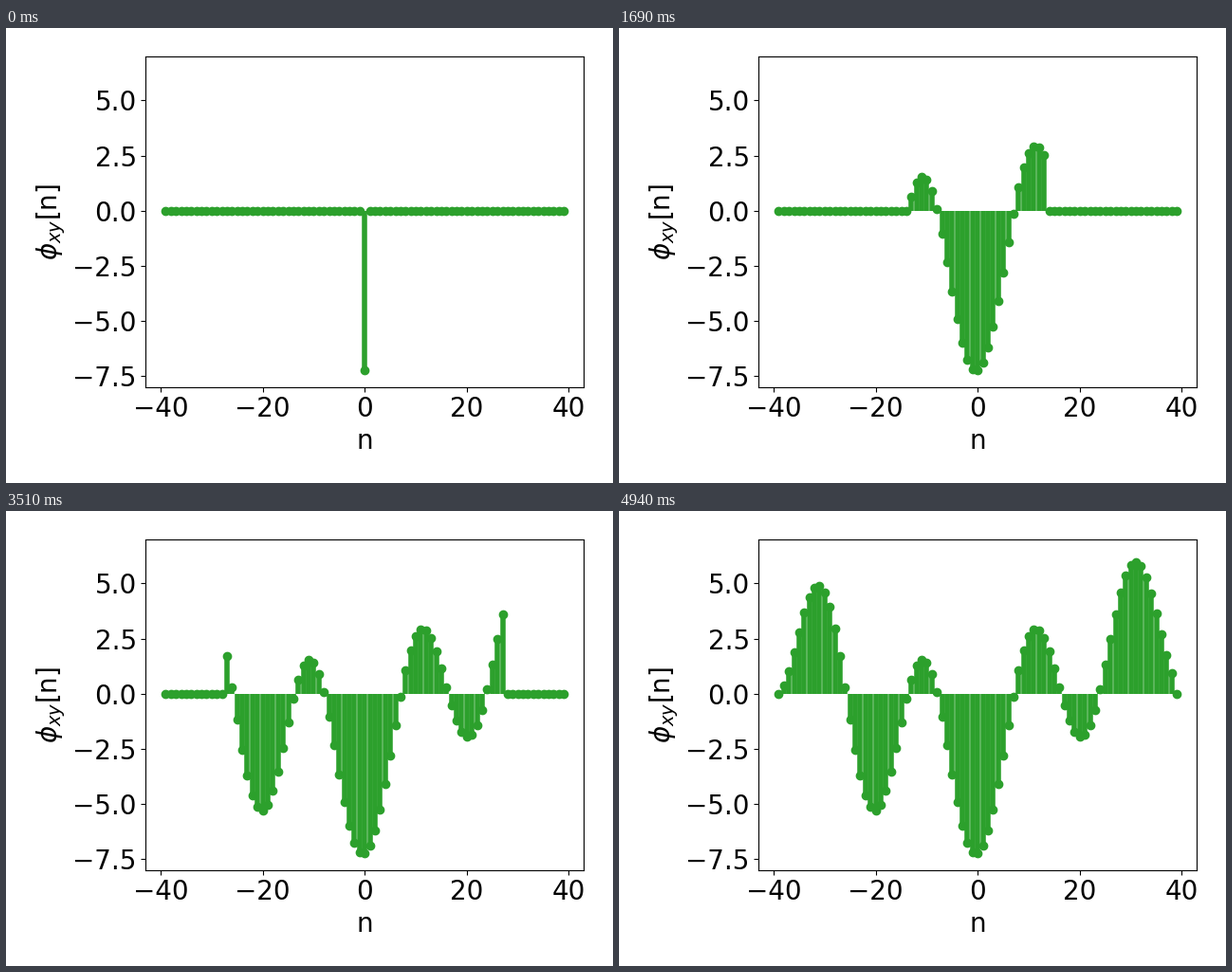
These frames come from a looping animation (640 px wide and 480 px high, 5070 ms). A matplotlib script:

```python
import numpy as np
import matplotlib.pyplot as plt
from matplotlib.animation import FuncAnimation

plt.rcParams.update({"font.size": 20, "font.family": "DejaVu Sans"})

N = 40
TAU = 20
OMEGA = np.pi / 10
GREEN = "#2ca02c"

lags = np.arange(-N + 1, N)


def correlation(n):
    """Cross-correlation of a sine with an exponential charging curve."""
    m = np.abs(n)
    right = 4.41 - 8.36 * np.exp(-m / TAU) - 3.28 * np.cos(OMEGA * m)
    left = -4.41 + 1.131 * np.exp(m / TAU) - 3.95 * np.cos(OMEGA * m)
    return np.where(n >= 0, right, left) - 0.70 * np.sin(OMEGA * m)


phi = correlation(lags)

fig, ax = plt.subplots(figsize=(6.4, 4.8), dpi=100)
markers, stems, _ = ax.stem(lags, np.zeros(lags.size), basefmt=" ")
markers.set_color(GREEN)
stems.set(color=GREEN, linewidth=4)
ax.set_xlim(-42.9, 42.9)
ax.set_ylim(-8, 7)
ax.set_xlabel("n")
ax.set_ylabel(r"$\phi_{xy}$[n]")
fig.tight_layout()


def update(i):
    """Reveal all lags up to i on both sides of zero."""
    y = np.where(np.abs(lags) <= i, phi, 0)
    markers.set_ydata(y)
    stems.set_segments([[(n, 0), (n, v)] for n, v in zip(lags, y)])
    return markers, stems


anim = FuncAnimation(fig, update, frames=N - 1, interval=130,
                     repeat=True, repeat_delay=0)
plt.show()
```
